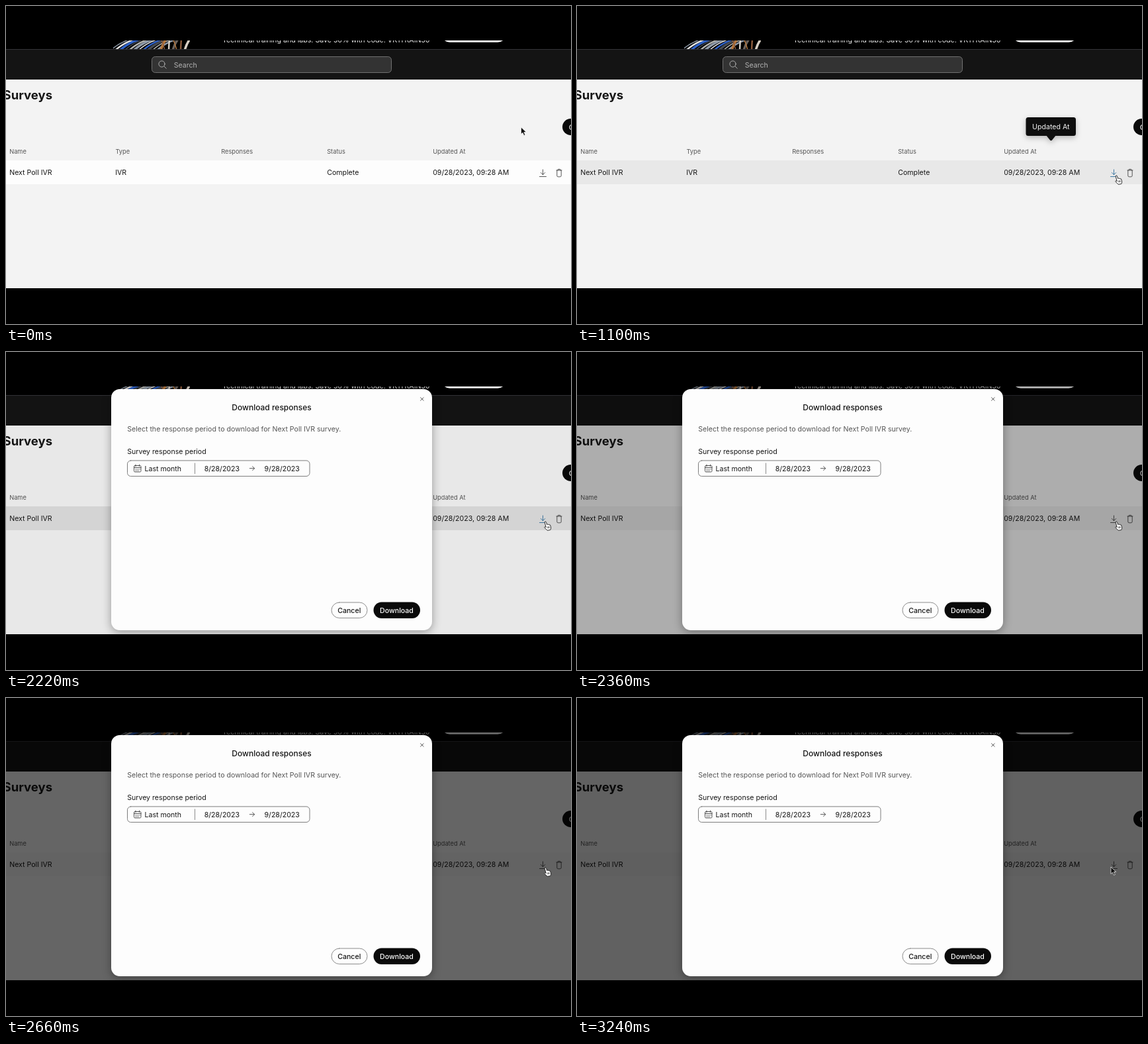
An HTML page that plays this animation: 854x480 px, repeating every 3.26 s.

```html
<!DOCTYPE html>
<html lang="en">
<head>
<meta charset="utf-8">
<title>Download survey responses</title>
<style>
  html, body { margin: 0; width: 100%; height: 100%; overflow: hidden; background: #000; }
  svg { display: block; width: 854px; height: 480px; font: 10.6px Inter, sans-serif; fill: #161616; }
  .head { font-size: 9.25px; fill: #555; }
  .line { fill: none; stroke: #444; stroke-width: .9; stroke-linecap: round; stroke-linejoin: round; }
  .mid { text-anchor: middle; }
  .bold { font-weight: 500; }
  .tip { filter: drop-shadow(0 3px 4px rgba(0, 0, 0, .25)); fill: #0e0e0e; }
  .tip text { fill: #f4f4f4; }
  #modal { filter: drop-shadow(0 3px 7px rgba(0, 0, 0, .35)); }
</style>
</head>
<body>
<svg viewBox="0 0 854 480">
  <defs>
    <clipPath id="screen"><rect y="52" width="854" height="374"/></clipPath>
    <clipPath id="banner"><rect x="162" y="52" width="116" height="13"/></clipPath>
  </defs>
  <rect width="854" height="480" fill="#000"/>
  <g clip-path="url(#screen)">
    <rect y="111" width="854" height="315" fill="#f3f3f3"/>

    <!-- promotion banner -->
    <g id="strands" clip-path="url(#banner)" fill="none"></g>
    <text x="327" y="54.8" font-size="10.65" fill="#eee">Technical training and labs. Save 50% with code: VK1TRAIN50</text>
    <rect x="658" y="29" width="98" height="25.8" rx="12.9" fill="#fff"/>

    <!-- search bar -->
    <rect y="65" width="854" height="46" fill="#141414"/>
    <path d="M0 65.5H854" stroke="#333338"/>
    <rect x="220.5" y="76.5" width="362" height="24" rx="5" fill="#333" stroke="#707070"/>
    <g class="line" style="stroke:#bbb"><circle cx="235.5" cy="87.5" r="4.6"/><path d="M239 91l3.2 3.2"/></g>
    <text x="253.7" y="92.7" fill="#b0b0b0">Search</text>

    <!-- survey table -->
    <text x="70" y="141" text-anchor="end" font-size="18.5" font-weight="700">Surveys</text>
    <rect x="841" y="170" width="70" height="25" rx="12.5" fill="#0a0a0a"/>
    <text x="850.8" y="186.5" class="bold" fill="#f3f3f3">Create</text>
    <g class="head">
      <text x="5.2" y="222.7">Name</text>
      <text x="165.4" y="222.7">Type</text>
      <text x="325.2" y="222.7">Responses</text>
      <text x="485.2" y="222.7">Status</text>
      <text x="645.2" y="222.7">Updated At</text>
    </g>
    <rect id="row" y="233" width="854" height="36"/>
    <text x="5.2" y="255">Next Poll IVR</text>
    <text x="165.2" y="255">IVR</text>
    <text x="485.2" y="255">Complete</text>
    <text x="645.2" y="255">09/28/2023, 09:28 AM</text>
    <path id="save" class="line" d="M811.5 247v7.5M808.3 251.5l3.2 3.2 3.2-3.2M806.5 257.5h10"/>
    <path class="line" d="M832 248h8M834.3 248v-1.6h3.4v1.6M832.8 248v8q0 1.8 1.8 1.8h2.8q1.8 0 1.8-1.8v-8"/>

    <g id="headTip" class="tip">
      <path d="M709 195h15l-6 7.5q-1.5 1.5-3 0z"/>
      <rect x="678.5" y="168" width="75.5" height="28" rx="3.5"/>
      <text class="mid" x="716.3" y="186.3">Updated At</text>
    </g>
    <g id="saveTip" class="tip">
      <path d="M804 234h15l-6 7.5q-1.5 1.5-3 0z"/>
      <rect x="777.5" y="207" width="68.5" height="28.5" rx="3.5"/>
      <text class="mid" x="811" y="225.3">Download</text>
    </g>
    <circle id="ring" cx="817" cy="256" fill="none" stroke="#1a1a1a" stroke-width="1.3"/>

    <rect id="shade" y="52" width="854" height="374" fill="#000"/>

    <!-- dialog -->
    <g id="modal">
      <rect x="159" y="56" width="485" height="364" rx="13" fill="#fdfdfd"/>
      <path class="line" d="M626.5 68.7l4.6 4.6M631.1 68.7l-4.6 4.6"/>
      <text class="mid bold" x="401.5" y="87.5" font-size="12">Download responses</text>
      <text x="183.2" y="119.5" fill="#555">Select the response period to download for Next Poll IVR survey.</text>
      <text x="183.2" y="153.7">Survey response period</text>
      <rect class="line" x="183.5" y="163.9" width="275.5" height="23.6" rx="5" style="stroke:#707070"/>
      <path class="line" d="M195 171.5h7.5q1.5 0 1.5 1.5v6.5q0 1.5-1.5 1.5h-7.5q-1.5 0-1.5-1.5v-6.5q0-1.5 1.5-1.5zM196 170v2.5M201.5 170v2.5M193.5 174.5h10.5"/>
      <path class="line" stroke-dasharray="1 2" d="M196 177h6.5M196 179h5"/>
      <text x="209.5" y="179.7">Last month</text>
      <path d="M285.5 167.5v16.5" stroke="#8c8c8c"/>
      <text x="299.7" y="179.7">8/28/2023</text>
      <path class="line" d="M368.3 175.7h7.2M372.6 172.7l3 3-3 3"/>
      <text x="390.5" y="179.7">9/28/2023</text>
      <rect class="line" x="492" y="378" width="54" height="23.5" rx="11.75" style="stroke:#808080"/>
      <text class="mid bold" x="518.8" y="393.7">Cancel</text>
      <rect x="555.5" y="377.5" width="70.5" height="24.5" rx="12.2" fill="#0a0a0a"/>
      <text class="mid bold" x="590.5" y="393.7" fill="#fff">Download</text>
    </g>

    <path id="arrow" d="M0 0v10.5l2.5-2.3 1.9 4.2 1.9-.8-1.9-4.1h3.4z" fill="#0c0c0c" stroke="#fff" stroke-width=".7"/>
    <path id="hand" d="M-.8 1.2q0-1.3 1-1.3t1.4 1.2l1 3.3q1-.9 1.8.1 1-.7 1.7.3 1.5-.4 1.8 1.2l.7 3q.2 1.7-.8 3.5l-4.6.8q-1.3-1.6-3.8-3.6-1.3-1.5.2-1.9.8 0 1.7.9zM3.7 7.5l.5 2.7M5.6 7.2l.5 2.7" fill="#fff" stroke="#161616" stroke-width=".9" stroke-linejoin="round"/>
  </g>
</svg>
<script>
const LOOP = 3260;
const $ = id => document.getElementById(id);
const clamp = x => Math.max(0, Math.min(1, x));
const mix = (a, b, p) => a + (b - a) * p;
const smooth = p => p * p * (3 - 2 * p);
const show = (id, on) => $(id).style.display = on ? '' : 'none';

// Row greys
const PLAIN = 253, HOVER = 232, PRESSED = 222, IDLE = 238;

const cool = ['#8f9aa8', '#e6e6e6', '#2f62c8', '#454a52', '#b4b4b0'];
const warm = ['#8a5a3c', '#d8cfc4', '#6a625c', '#b4763c'];
$('strands').innerHTML = Array.from({length: 18}, (_, i) => {
  const right = i > 10;
  const x = right ? 168 + i * 6 : 158 + i * 7;
  const bend = right ? -6 + (i % 3) * 7 : 30;
  const color = right ? warm[i % 4] : cool[i % 5];
  return `<path d="M${x} 67Q${x + bend * .4} 56 ${x + bend} 50" stroke="${color}" stroke-width="${1.5 + i % 3}"/>`;
}).join('');

// Screen updates come in uneven beats of 20, 100 and 20 ms.
function stepAt(t) {
  const rest = t % 140;
  return 3 * Math.floor(t / 140) + (rest >= 20) + (rest >= 120);
}

function rowColor(n) {
  const grey = n < 36 ? mix(PLAIN, HOVER, clamp((n - 11) / 3))
    : n < 48 ? mix(HOVER, PRESSED, clamp((n - 36) / 3))
    : mix(PRESSED, IDLE, clamp((n - 47) / 4));
  return `rgb(${grey} ${grey} ${grey})`;
}

function draw() {
  const n = stepAt(performance.now() % LOOP);
  const go = smooth(clamp((n - 1) / 17));
  const back = smooth(clamp((n - 62) / 7));
  const x = mix(mix(778.5, 815, go), 807, back);
  const y = mix(mix(183, 256, go), 255, back);
  const pointing = n >= 14 && n < 63;

  show('arrow', !pointing);
  show('hand', pointing);
  for (const id of ['arrow', 'hand']) $(id).setAttribute('transform', `translate(${x} ${y})`);

  $('row').setAttribute('fill', rowColor(n));
  $('save').style.stroke = n >= 14 && n < 50 ? '#2f6f9c' : '';
  show('headTip', n >= 10 && n < 26);
  show('saveTip', n >= 28 && n < 47);

  show('ring', n >= 37 && n < 43);
  $('ring').setAttribute('r', mix(9, 23.2, clamp((n - 36) / 4)));

  const fade = clamp((n - 46.5) * .08);
  $('shade').setAttribute('opacity', .6 * (1 - (1 - fade) ** 2));
  show('modal', n >= 47);
  requestAnimationFrame(draw);
}
draw();
</script>
</body>
</html>
```
